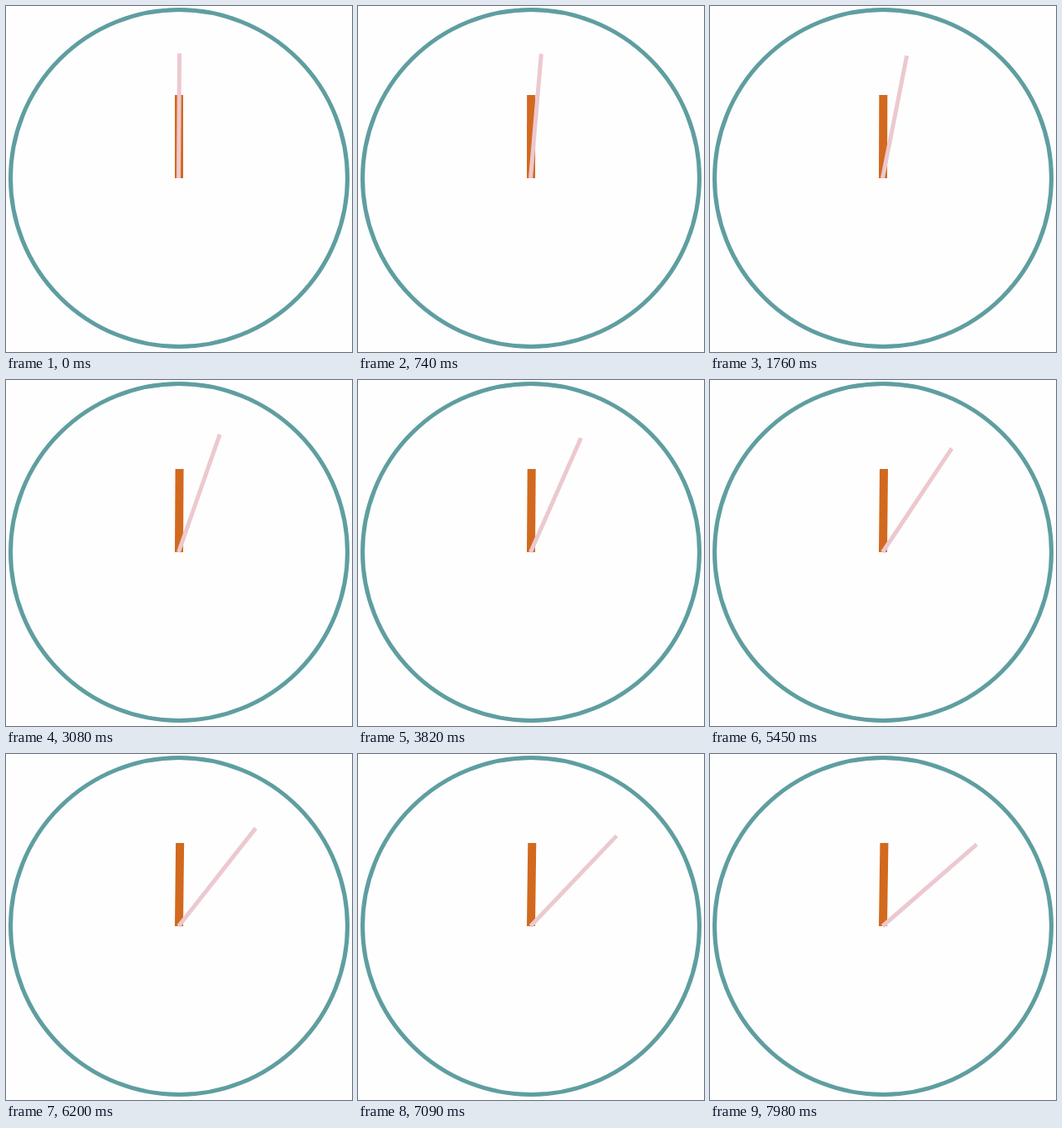
An HTML page for the animation above (8000 ms loop, 416x416 px).

```html
<!DOCTYPE html>
<html lang="en">
<head>
<meta charset="utf-8">
<title>Clock</title>
<style>
  html, body { margin: 0; width: 100%; height: 100%; overflow: hidden; background: #fefefe; }
  svg { display: block; width: 100%; height: 100%; }
</style>
</head>
<body>
<svg viewBox="0 0 416 416">
  <circle cx="208" cy="207" r="202.5" fill="none" stroke="cadetblue" stroke-width="5"/>
  <rect id="minute" x="203" y="107" width="10" height="100" fill="chocolate"/>
  <rect id="second" x="205" y="57" width="5" height="150" fill="#ecc9cf"/>
</svg>
<script>
const LOOP = 8000;          // ms
const TICK = 147.8;         // ms between steps of the hands
const LEAD = 25;            // ms by which the first step comes early
const START_ANGLE = 0.4;    // degrees
const STEP_ANGLE = 0.9;

const minute = document.getElementById("minute");
const second = document.getElementById("second");

function turn(hand, angle, pivotX) {
  hand.setAttribute("transform", `rotate(${angle} ${pivotX} 207)`);
}

function draw() {
  const time = performance.now() % LOOP;
  const angle = START_ANGLE + STEP_ANGLE * Math.floor((time + LEAD) / TICK);
  turn(second, angle, 207.5);
  turn(minute, angle / 60, 208);
  requestAnimationFrame(draw);
}
draw();
</script>
</body>
</html>
```
